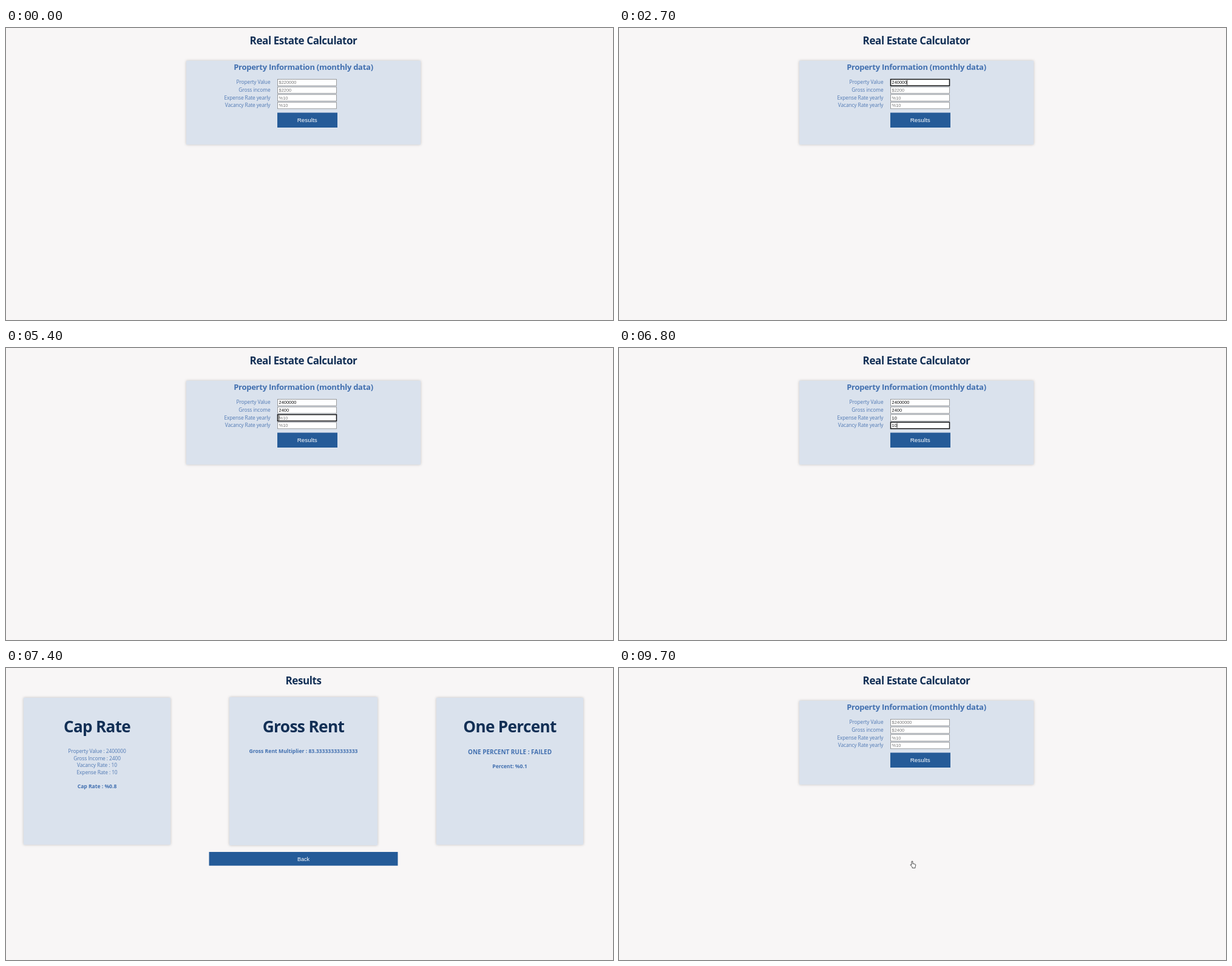
An HTML page that plays this animation: 1000x481 px, repeating every 10000 ms.

```html
<!DOCTYPE html>
<html lang="en">
<head>
<meta charset="utf-8">
<title>Real Estate Calculator</title>
<style>
  html, body { margin: 0; width: 100%; height: 100%; overflow: hidden; background: #f8f6f6; }
  svg { display: block; width: 1000px; height: 481px; }
  text { font-family: "Open Sans", "Noto Sans", sans-serif; white-space: pre; }
  .title { font-size: 17.05px; font-weight: 700; letter-spacing: -.025em; fill: #122f55; text-anchor: middle; }
  .sub { font-size: 13px; font-weight: 700; letter-spacing: -.02em; fill: #4270b0; text-anchor: middle; }
  .label { font-size: 8.35px; letter-spacing: -.01em; fill: #5079b4; text-anchor: end; }
  .field { font: 7.4px "Liberation Sans", Arial, sans-serif; }
  .btn { font: 9.9px "Liberation Sans", Arial, sans-serif; fill: #fff; text-anchor: middle; }
  .head { font-size: 26.9px; font-weight: 700; letter-spacing: -.025em; fill: #122f55; text-anchor: middle; }
  .line { font-size: 8.4px; letter-spacing: -.01em; fill: #5079b4; text-anchor: middle; }
  .strong { font-size: 8.55px; font-weight: 700; fill: #4270b0; text-anchor: middle; }
  .big { font-size: 9.95px; }
  .panel { fill: #dae2ed; filter: drop-shadow(0 0 2px rgba(0, 0, 0, .22)); }
  .blue { fill: #255b98; }
</style>
</head>
<body>
<svg id="stage" viewBox="0 0 1000 481"></svg>
<script>
const stage = document.getElementById('stage');

function add(parent, tag, attrs = {}, content = '') {
  const el = document.createElementNS('http://www.w3.org/2000/svg', tag);
  for (const k in attrs) el.setAttribute(k, attrs[k]);
  el.textContent = content;
  return parent.appendChild(el);
}
const set = (el, attrs) => { for (const k in attrs) el.setAttribute(k, attrs[k]); };
const show = (el, on) => set(el, { visibility: on ? 'visible' : 'hidden' });
const text = (parent, cls, x, y, s) => add(parent, 'text', { class: cls, x, y }, s);
const rect = (parent, x, y, width, height, attrs) =>
  add(parent, 'rect', { x, y, width, height, ...attrs });

rect(stage, 0, 0, 1000, 481, { fill: '#f8f6f6' });

// Form page
const form = add(stage, 'g');
text(form, 'title', 490, 26.7, 'Real Estate Calculator');
rect(form, 297, 54, 386, 138, { class: 'panel' });
text(form, 'sub', 490, 68.7, 'Property Information (monthly data)');

const labels = ['Property Value', 'Gross income', 'Expense Rate yearly', 'Vacancy Rate yearly'];
const hintsBefore = ['$220000', '$2200', '%10', '%10'];
const hintsAfter = ['$2400000', '$2400', '%10', '%10'];
const fields = labels.map((name, i) => {
  const y = 84 + i * 12.6;
  text(form, 'label', 435.5, y + 8.4, name);
  const box = rect(form, 447.5, y + .5, 97, 10.6, { fill: '#fff' });
  const value = text(form, 'field', 449.6, y + 8.3, '');
  const caret = rect(form, 449, y + 1.8, .8, 8, { fill: '#000' });
  return { box, value, caret };
});
rect(form, 447, 139.5, 99, 24.5, { class: 'blue' });
text(form, 'btn', 496.2, 155, 'Results');

// Results page
const results = add(stage, 'g');
text(results, 'title', 490, 26.7, 'Results');

const cards = [
  { x: 237, head: 'Cap Rate', lines: [
    ['line', 143, 'Property Value : 2400000'], ['line', 154.6, 'Gross Income : 2400'],
    ['line', 166.2, 'Vacancy Rate : 10'], ['line', 177.8, 'Expense Rate : 10'],
    ['strong', 201, 'Cap Rate : %0.8']] },
  { x: 490, head: 'Gross Rent', lines: [['strong', 143, 'Gross Rent Multiplier : 83.33333333333333']] },
  { x: 743, head: 'One Percent', lines: [
    ['strong big', 144.6, 'ONE PERCENT RULE : FAILED'], ['strong', 168.3, 'Percent: %0.1']] }
].map(({ x, head, lines }) => {
  const g = add(results, 'g');
  rect(g, -121, 49, 242, 242, { class: 'panel' });
  const h = text(g, 'head', 0, 0, head);
  const body = add(g, 'g');
  lines.forEach(([cls, y, s]) => text(body, cls, 0, y, s));
  return { x, g, h, body };
});
const back = add(results, 'g');
rect(back, -169, -12.3, 338, 24.6, { class: 'blue' });
text(back, 'btn', 0, 3.5, 'Back');

// Pointers, each with its hot spot at the origin
const ink = { fill: '#fff', stroke: '#222', 'stroke-width': .8, 'stroke-linejoin': 'round' };
const pointers = {
  arrow: add(stage, 'path', { ...ink, d: 'M0 0V10L2.3 7.9L3.9 11.5L5.4 10.8L3.9 7.3H7Z' }),
  hand: add(stage, 'path', { ...ink,
    d: 'M-1 1Q0-.6 1 1V4.6L5 5.4Q6 5.8 5.8 7L5 9.8V11.6H.2V10.2L-3 6.6Q-3 5.2-1 6.6Z' }),
  beam: add(stage, 'path', { fill: 'none', stroke: '#222', 'stroke-width': .8,
    d: 'M-1.8-4.5H1.8M0-4.5V4.5M-1.8 4.5H1.8' })
};

// [time, field, typed text]
const keys = [
  [700, 0, ''], [1600, 0, '2'], [2000, 0, '24'], [2100, 0, '240'], [2300, 0, '2400'],
  [2500, 0, '24000'], [2700, 0, '240000'], [2800, 0, '2400000'],
  [3400, 1, ''], [3900, 1, '2'], [4200, 1, '24'], [4900, 1, '240'], [5300, 1, '2400'],
  [5400, 2, ''], [5900, 2, '1'], [6000, 2, '10'],
  [6400, 3, ''], [6600, 3, '1'], [6800, 3, '10']
];

// [time, x, y, pointer]
const moves = [
  [0, 0, 0, ''], [100, 483, 321, 'arrow'], [200, 482, 290, 'arrow'], [300, 480, 240, 'arrow'],
  [400, 478, 193, 'arrow'], [500, 476, 152, 'hand'], [700, 466, 102, 'beam'], [800, 452, 90, 'beam'],
  [1200, 0, 0, ''],
  [8000, 455, 98, 'arrow'], [8100, 459, 122, 'arrow'], [8200, 465, 165, 'arrow'],
  [8300, 472, 218, 'arrow'], [8400, 478, 268, 'arrow'], [8500, 482, 304, 'hand'], [8600, 483, 317.8, 'hand']
];

function drawForm(t) {
  const done = t >= 9400;
  const hints = done ? hintsAfter : hintsBefore;
  const typed = ['', '', '', ''];
  let focus = -1;
  if (!done) for (const [at, i, s] of keys) if (t >= at) { typed[i] = s; focus = i; }
  fields.forEach(({ box, value, caret }, i) => {
    const on = i === focus;
    set(box, { stroke: on ? '#111' : '#858585', 'stroke-width': on ? 1.5 : .8 });
    value.textContent = typed[i] || hints[i];
    set(value, { fill: typed[i] ? '#111' : '#7a7a7a' });
    set(caret, { x: 449.4 + typed[i].length * 4.115 });
    caret.style.display = on ? '' : 'none';
  });
}

function drawResults(t) {
  const u = Math.max(0, (7600 - t) / 100) ** 2;
  cards.forEach(({ x, g, h, body }, i) => {
    const s = i === 1 ? 1 + .002 * u : 1;
    set(g, { transform: `translate(${x + (i - 1) * 21.75 * u} 170) scale(${s}) translate(0 -170)` });
    set(h, { transform: `translate(0 ${107.7 - .35 * u}) scale(${1 - .0075 * u})` });
    set(body, { transform: `translate(0 ${-.72 * u})` });
  });
  set(back, { transform: `translate(490 314.3) scale(${1 - .02 * u})` });
}

function draw(ms) {
  const t = Math.floor(ms % 10000 / 100) * 100;
  const onResults = t >= 7200 && t < 9400;
  form.style.display = onResults ? 'none' : '';
  results.style.display = onResults ? '' : 'none';
  if (onResults) drawResults(t); else drawForm(t);

  const [, x, y, kind] = moves.filter(m => m[0] <= t).pop();
  for (const k in pointers) {
    show(pointers[k], k === kind);
    set(pointers[k], { transform: `translate(${x} ${y})` });
  }
}

const start = performance.now();
function tick() {
  draw(performance.now() - start);
  requestAnimationFrame(tick);
}
tick();
</script>
</body>
</html>
```
